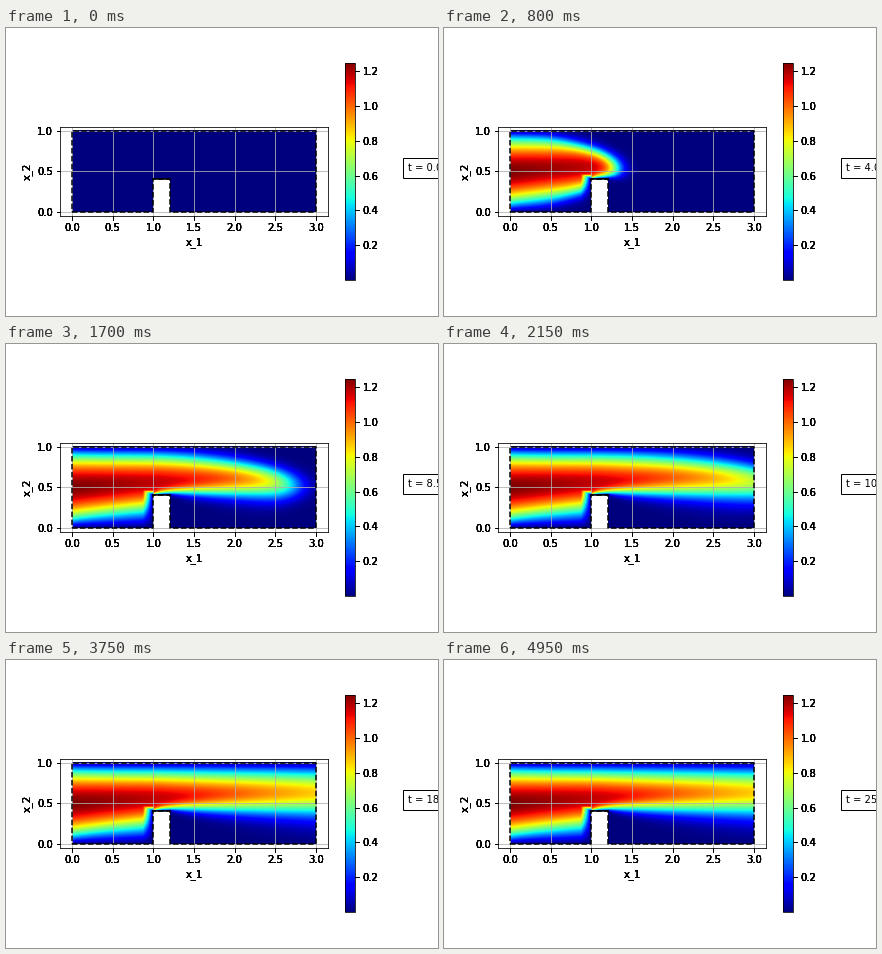
Write a matplotlib script that moves like this. It is 432 by 288 pixels and loops after 5000 ms.

```python
import numpy as np
import matplotlib.pyplot as plt
from matplotlib.animation import FuncAnimation
from matplotlib.patches import Rectangle

FRAMES, T_END = 100, 25.0
H = 0.0125            # grid spacing
SUBSTEPS = 20
DIFFUSION = 0.002
V_MAX = 0.33

plt.rcParams.update({
    "font.family": "DejaVu Sans",
    "font.size": 10,
    "figure.subplot.bottom": 0.125,
})


def simulate():
    """Advect and diffuse a parabolic inflow past the block."""
    x = np.arange(0, 3 + H / 2, H)
    y = np.arange(0, 1 + H / 2, H)
    X, Y = np.meshgrid(x, y)
    block = (X > 1 - H / 2) & (X < 1.2 + H / 2) & (Y < 0.4 + H / 2)

    vx = (4 * V_MAX * Y * (1 - Y))[1:-1, 1:-1]
    vy = np.where(X < 1.1, 0.16 * Y * (1 - Y) ** 2, 0)[1:-1, 1:-1]
    dt = T_END / (FRAMES - 1) / SUBSTEPS

    # the field falls linearly to zero in front of the block
    ramp = np.clip(np.maximum((1 - X) / 0.13, (Y - 0.4) / 0.06), 0, 1)
    ramp[X > 1] = 1

    c = np.zeros_like(X)
    fields = [c.copy()]
    c[:, 0] = 5 * y * (1 - y)
    for _ in range(FRAMES - 1):
        for _ in range(SUBSTEPS):
            mid = c[1:-1, 1:-1]
            west, east = c[1:-1, :-2], c[1:-1, 2:]
            south, north = c[:-2, 1:-1], c[2:, 1:-1]
            spread = DIFFUSION * (west + east + south + north - 4 * mid) / H**2
            drift = (vx * (east - west) + vy * (north - south)) / (2 * H)
            c[1:-1, 1:-1] = mid + dt * (spread - drift)
            c[:, -1] = c[:, -2]
            c[block] = 0
        fields.append(np.clip(c * ramp, 0, 1.25))
    return fields


def harden(artist, times=6):
    """Draw an artist repeatedly so that its soft edges turn solid."""
    draw = artist.draw

    def draw_often(renderer):
        for _ in range(times):
            draw(renderer)

    artist.draw = draw_often


def harden_axis(axis):
    harden(axis.label)
    for tick in axis.get_major_ticks():
        for part in (tick.label1, tick.label2, tick.tick1line, tick.tick2line):
            harden(part)


fields = simulate()

fig, ax = plt.subplots(figsize=(6, 4), dpi=72)
image = ax.imshow(fields[0], extent=(0, 3, 0, 1), origin="lower", cmap="jet",
                  vmin=0, vmax=1.25, interpolation="bilinear", zorder=0)
ax.add_patch(Rectangle((1, 0), 0.2, 0.4, fc="white", ec="none", zorder=1))

outline = np.array([(0, 0), (1, 0), (1, 0.4), (1.2, 0.4), (1.2, 0),
                    (3, 0), (3, 1), (0, 1), (0, 0)])
ax.plot(*outline.T, "k--", lw=1.5)
ax.plot([1, 1.2], [0.4, 0.4], "k", lw=1.5)

ax.set(xlim=(-0.15, 3.15), ylim=(-0.05, 1.05), xlabel="x_1", ylabel="x_2")
ax.set_xticks(np.arange(0, 3.1, 0.5))
ax.set_yticks([0, 0.5, 1])
ax.grid(True)

bar = fig.colorbar(image, ax=ax)
bar.set_ticks(np.arange(0.2, 1.3, 0.2))

for axis in (ax.xaxis, ax.yaxis, bar.ax.yaxis):
    harden_axis(axis)

clock = ax.text(1.3, 0.5, "", transform=ax.transAxes,
                bbox={"facecolor": "white", "pad": 5})


def update(i):
    image.set_data(fields[i])
    clock.set_text(f"t = {T_END * i / (FRAMES - 1):.6f}")
    return image, clock


anim = FuncAnimation(fig, update, frames=FRAMES, interval=50,
                     repeat=True, repeat_delay=0)
plt.show()
```
